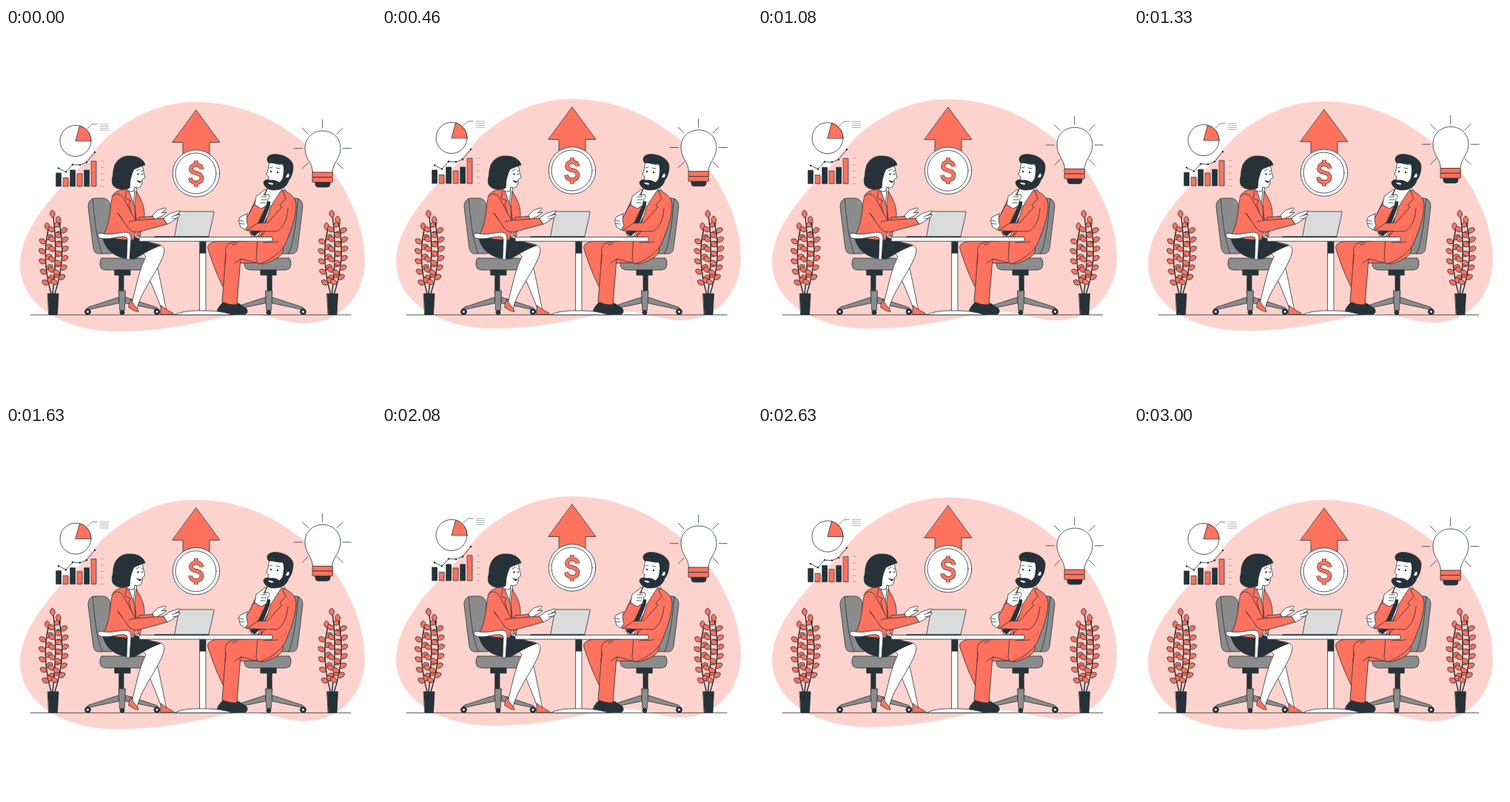
Write an HTML page that moves like this. It is 500 by 500 pixels and loops after 3040 ms.

```html
<!DOCTYPE html>
<html lang="en">
<head>
<meta charset="utf-8">
<title>Business meeting</title>
<style>
html, body { margin: 0; width: 100%; height: 100%; overflow: hidden; background: #fff; }
svg { display: block; width: 100vw; height: 100vh; }
.line { fill: none; stroke: #263238; stroke-width: .8; stroke-linejoin: round; stroke-linecap: round; }
.r { fill: #ff725e; }
.d { fill: #263238; }
.w { fill: #fff; }
.g { fill: #8c8c8c; }
.l { fill: #dbdbdb; }
.n { stroke: none; }
</style>
</head>
<body>
<svg viewBox="0 0 500 500">
<defs>
  <g id="chair" class="line">
    <path class="g" d="M111 241C111 234 115 230 121 230H130C137 230 140 234 141 241L147 296C148 302 145 305 140 305H125C121 305 119 302 118 298Z"/>
    <path d="M117 231C120 256 121 282 130 305"/>
    <path class="g" d="M130 311H183Q190 311 190 318Q190 327 181 327H135Q127 327 127 319Q127 311 130 311Z"/>
    <path class="d" d="M147 327H168V334H147Z"/>
    <path class="d" d="M153 334H159V361H153Z"/>
    <path class="g" d="M152 364L112 377Q109 378 109 381L152 372ZM162 364L202 377Q206 378 206 381L162 372Z"/>
    <path class="g" d="M152.500 355H161.500L160 382H154Z"/>
    <circle class="d" cx="110.500" cy="383.500" r="4"/>
    <circle class="w n" cx="110.500" cy="383.500" r="1.400"/>
    <circle class="d" cx="157" cy="384.500" r="3"/>
    <circle class="d" cx="204" cy="383.500" r="4"/>
    <circle class="w n" cx="204" cy="383.500" r="1.400"/>
  </g>
  <g id="plant" class="line">
    <g id="stems"></g>
    <path class="d" d="M56.500 359H71L69.500 387.500H58Z"/>
  </g>
</defs>

<g id="slow" class="line">
  <path fill="#ffd3cd" class="n" d="M252 100C312 99 358 121 392 147C424 170 447 196 460 224C476 254 485 285 485 316C483 365 450 398 405 399C375 399 355 386 322 387C283 389 236 410 150 410C75 410 19 372 19 320C19 280 50 240 86 203C110 179 120 163 138 146C172 118 210 101 252 100Z"/>
  <path class="r" d="M257 111L289 154.500H275V190H239V154.500H225Z"/>
  <circle class="w" cx="257" cy="196.500" r="31.700"/>
  <circle class="w" cx="256.500" cy="196.500" r="27.500"/>
  <g id="dollar" stroke-linecap="butt"></g>
  <circle class="w" cx="94" cy="152.500" r="21"/>
  <path class="r" d="M94 152.500L99.500 132A21 21 0 0 1 115 152.500Z"/>
  <path d="M109 137L116 130H123" stroke-width=".6"/>
  <path d="M127 130H138.500M127 132.700H138.500M127 135.400H138.500M127 138.100H138.500" stroke="#8b9094" stroke-width=".7"/>
  <path d="M128 180H132M128 188.500H132M128 197H132M128 205.500H132M128 214H132" stroke="#8b9094" stroke-width=".7"/>
  <g id="bars"></g>
</g>

<g id="bulb" class="line">
  <path id="rays"/>
  <path class="w" d="M414.500 195C414 182 404 177 404 162.500C404 149 414 139 428 139S452 149 452 162.500C452 177 441.500 182 441 195Z"/>
  <path class="d" d="M418 207H438V211Q438 215 434 215H422Q418 215 418 211Z"/>
  <rect class="r" x="414" y="195" width="27.500" height="6.700" rx="1"/>
  <rect class="r" x="414" y="201.700" width="27.500" height="6.700" rx="1"/>
</g>

<path class="line" d="M33 387.700H466"/>
<use href="#plant"/>
<use href="#plant" x="377.500"/>
<use href="#chair"/>
<use href="#chair" transform="matrix(-1 0 0 1 512 0)"/>

<g class="line" id="man">
  <path class="d" d="M293 371Q285 379 285.500 383V385.500H303L312 374Z"/>
  <path class="r" d="M340 288H287C277 289 271 293 273 299C279 318 288 341 297 357L306 318L350 317Z"/>
  <path class="d" d="M305 374L303 387H323Q328 385 325 379L314 372Z"/>
  <path class="r" d="M376 284L310 289C298 290 295 297 297 306L292 370Q302 375 312 374L317 312L346 319C362 315 371 310 374 302Z"/>
  <path d="M297 306L296 318M317 312L309 318M312 291L306 293"/>
  <path class="w" d="M354 217L374 214L380 224L352 281H331L341 234Z"/>
  <path class="d" d="M350 234L357 235L356 242L343 275L336 281L331 278L348 243Z"/>
  <path class="r" d="M375 219C385 224 392 230 392 239C392 257 384 276 377 293C370 304 358 314 341 319L338 313L340 283L352 257L366 239Z"/>
  <path class="r" d="M353 217L337 233L328 252L330 278L341 248L348 232Z"/>
  <path class="r" d="M373 218L378 231L370 239L373 243L344 283L358 241Z"/>
  <path class="r" d="M381 244C380 258 375 270 366 275L326 274L322 265L354 263L372 243"/>
  <path d="M348 290L368 289"/>
  <path class="r" d="M335 239L351 242L341 263L325 274L322 264Z"/>
  <path class="w" d="M349 219C350 217 352 218 351 221L348 226L355 225Q358 228 354 231L352 240L345 244L336 239L338 228Z"/>
  <path d="M345 228L352 228M345 232L352 232M344 236L350 236"/>
  <path class="w" d="M326 251L317 255Q313 259 315 263L317 269L323 273L327 267Q324 261 326 251Z"/>
  <path d="M315 260L321 261M316 264L322 265"/>
  <path class="w" d="M356 181C354 188 355 191 352 198L355 201L353 209C358 218 369 219 376 210L383 200C386 192 381 188 377 193L376 183Z"/>
  <path class="d" d="M355 182C351 178 353 172 360 171C371 169 388 176 388 187C388 194 386 201 382 206C380 213 374 219 362 219C353 219 348 213 348 208C351 204 355 205 357 206C363 205 367 207 369 209C374 206 375 201 375 197C376 192 376 188 374 184C367 185 362 182 355 182Z"/>
  <path class="w n" d="M354 209Q359 208 362 211Q357 213 354 209Z"/>
  <path class="w" d="M379 199C380 195 384 196 383 200C382 203 380 203 378 202"/>
  <path d="M356 189L360 188M365 189L370 190"/>
  <circle class="d n" cx="358" cy="194" r="1.200"/>
  <circle class="d n" cx="367" cy="195" r="1.200"/>
</g>

<g class="line" id="woman">
  <path class="w" d="M202 314C207 330 211 355 217 382L211 383C204 361 195 344 190 329Z"/>
  <path class="w" d="M190 291C203 290 214 293 214 300C212 321 183 352 177 380L169 376C176 350 179 329 189 309L181 299Z"/>
  <path class="r" d="M169 366C167 372 165 375 166 378C170 379 174 384 179 383C179 379 173 377 169 366Z"/>
  <path class="r" d="M210 375C209 381 208 384 209 387H227C226 384 218 383 210 375Z"/>
  <path class="d" d="M136 276L172 282L198 291L209 294C197 298 187 304 174 312C158 313 136 307 131 284Z"/>
  <path class="w" d="M163 210H175L179 234L181 281H160Z"/>
  <path d="M174 219L172 239L176 280"/>
  <path class="r" d="M164 216C154 219 146 221 144 227C140 240 142 261 132 279Q149 288 173 286L176 258Z"/>
  <path class="r" d="M176 221C182 230 188 241 187 255L181 282L178 280L174 239Z"/>
  <path class="r" d="M164 216L161 230L168 233L166 238L176 271L174 242Z"/>
  <path class="r" d="M180 256L202 254L200 263L180 267Z"/>
  <path class="w" d="M198 253L205 246L215 243Q218 244 214 247L210 250L217 249L211 254L201 259Z"/>
  <path class="r" d="M143 229C147 221 157 223 161 234L175 260L213 257L218 265L181 275Q171 278 165 270L151 250"/>
  <path d="M166 262L175 260M151 250L157 258"/>
  <path class="w" d="M168 182L182 181C186 189 185 193 188 202L184 205C185 213 181 218 174 215L173 220Q167 223 162 217L160 199Z"/>
  <path class="d" d="M145 194C146 180 156 172 168 173C179 173 186 178 188 185C182 187 177 189 173 191C171 195 169 200 168 206L167 216C158 221 146 217 144 211C142 205 145 200 145 194Z"/>
  <path d="M176 193L180 191M183 193L185 193"/>
  <path class="d" d="M177 206Q180 208 183 207Q181 211.500 177 206Z"/>
  <circle class="d n" cx="178.500" cy="197.500" r="1.200"/>
  <circle class="d n" cx="184" cy="197.500" r="1"/>
  <path class="w" d="M127 277C142 281 151 276 163 276Q169 277 169 284L167 313H163L164 286Q164 282 160 282C149 281 141 287 127 284Q121 280 127 277Z"/>
</g>

<g class="line">
  <path class="w" d="M262 304H270V383H262Z"/>
  <path class="d" d="M262 288H270V304H262Z"/>
  <path class="w" d="M228 387.500C239 382 253 382 266 382S294 383 305 387.500Z"/>
  <rect class="w" x="180" y="282.500" width="180" height="5.700" rx="1"/>
  <path class="l" d="M235 248H280.500Q281.500 248 281 250L274 281.500L272 282.500H228Q227 282 228 280L234 249Z"/>
  <path class="d" d="M201 281.500H274V283H201Z" stroke-width=".4"/>
  <path class="w" d="M213 257L221 251L233 247Q237 247 233 250L229 253L235 252Q236 254 231 257L224 262L218 265Z"/>
  <path d="M229 253L224 255M231 257L225 258"/>
</g>
</svg>

<script>
const $ = id => document.getElementById(id);

// Each stem is a quadratic curve with pairs of leaves and one at the tip.
const stems = [
  [61, 48, 312, 57, 273, 5],
  [63, 70, 302, 64, 256, 6],
  [66, 82, 310, 72, 264, 6]
];
const mix = (u, a, b, c) => (1 - u) ** 2 * a + 2 * u * (1 - u) * b + u * u * c;
$('stems').innerHTML = stems.map(([x0, cx, cy, x1, y1, pairs]) => {
  const leaf = (u, turn) =>
    `<path class="r" transform="translate(${mix(u, x0, cx, x1)} ${mix(u, 359, cy, y1)}) rotate(${turn})"
      d="M0 0C2 -5 8 -5 10 0C8 4 2 4 0 0Z"/>`;
  let leaves = leaf(1, -100);
  for (let i = 0; i < pairs; i++) {
    const u = .14 + .8 * i / pairs;
    leaves += leaf(u, -152) + leaf(u + .06, -32);
  }
  return `<path d="M${x0} 359Q${cx} ${cy} ${x1} ${y1}" stroke-width="1.5"/>` + leaves;
}).join('');

const tops = [196, 202.5, 192, 197, 192, 180];
const trend = [[71, 189.5], [81, 194.5], [90, 184.5], [100, 185], [109, 181.5], [120, 168]];
$('bars').innerHTML = tops.map((y, i) =>
  `<rect class="${i % 2 ? 'r' : 'd'}" x="${68 + 9.5 * i}" y="${y}" width="6.5" height="${214 - y}"/>`).join('') +
  `<path d="M${trend.join('L')}"/>` +
  trend.map(([x, y]) => `<circle class="d n" cx="${x}" cy="${y}" r="1.2"/>`).join('');

const sign = 'M264.500 191C264 187 261 185 257 185C252 185 250 187.500 250 190.500C250 198.500 264.500 193.500 264.500 203C264.500 207 261 209 257 209C252 209 249.500 207 249 202.500M257 179V186M257 208V214.500';
$('dollar').innerHTML = [['#263238', 5.6], ['#ff725e', 4.4]]
  .map(([c, w]) => `<path d="${sign}" stroke="${c}" stroke-width="${w}"/>`).join('');

let rays = '';
for (let i = -3; i <= 3; i++) {
  const a = i * Math.PI / 4;
  const at = r => `${427.7 + r * Math.sin(a)} ${162.7 - r * Math.cos(a)}`;
  rays += `M${at(27.5)}L${at(38.7)}`;
}
$('rays').setAttribute('d', rays);

const LOOP = 3040;
const start = performance.now();
function bob(id, height, cycles, t) {
  const y = height / 2 * (Math.cos(2 * Math.PI * cycles * t / LOOP) - 1);
  $(id).setAttribute('transform', `translate(0 ${y})`);
}
function draw() {
  const t = (performance.now() - start) % LOOP;
  bob('slow', 6, 2, t);
  bob('bulb', 5.7, 1, t);
  requestAnimationFrame(draw);
}
draw();
</script>
</body>
</html>
```
